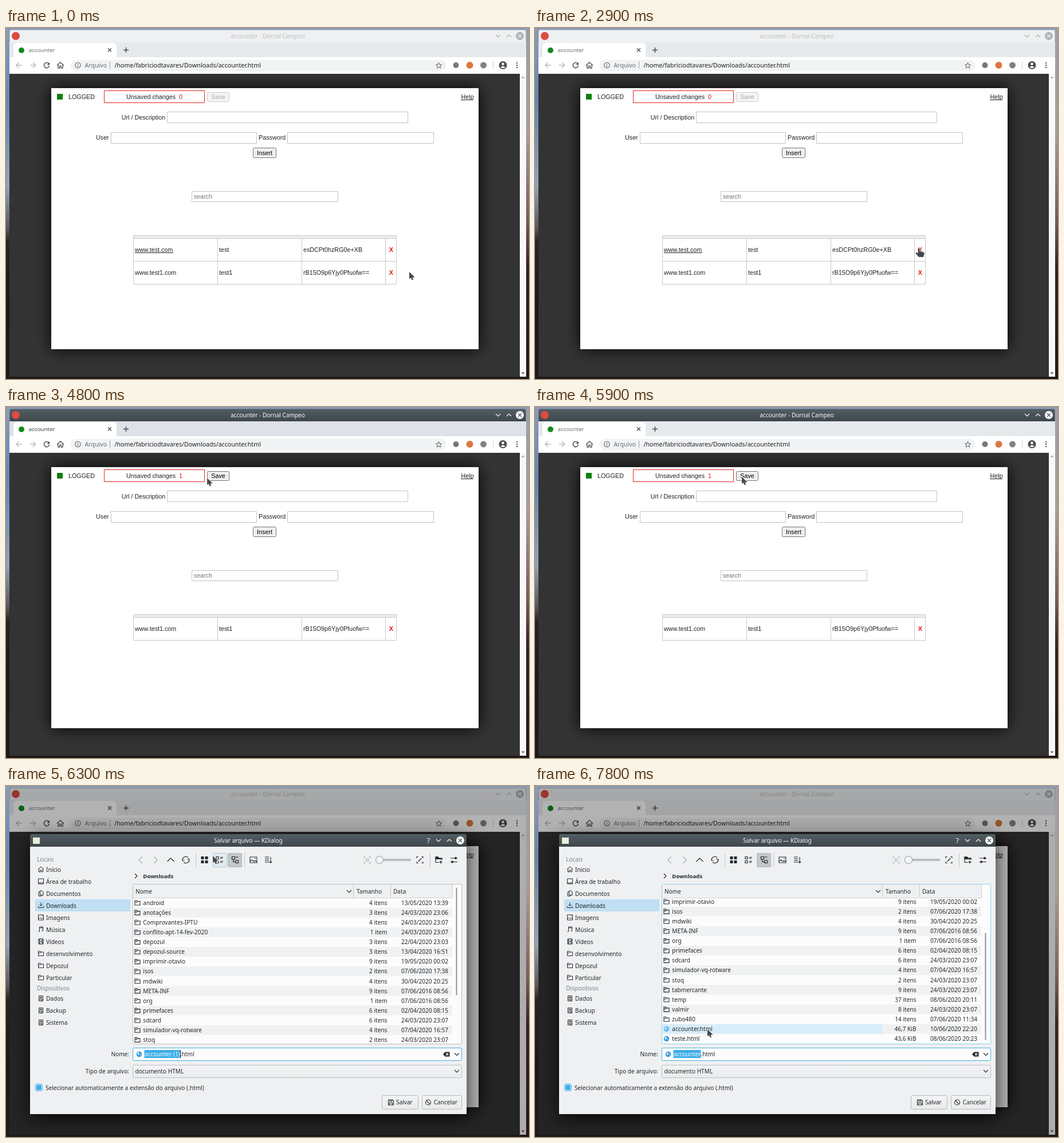
Recreate the animation shown at these times as an HTML page with a canvas. Size 913 by 613 pixels, loop 8000 ms.

```html
<!DOCTYPE html>
<html lang="pt-BR">
<head>
<meta charset="utf-8">
<title>accounter</title>
<style>
html, body { margin: 0; width: 100%; height: 100%; overflow: hidden; background: #333; }
canvas { display: block; }
</style>
</head>
<body>
<canvas id="stage" width="913" height="613"></canvas>
<script>
const ctx = document.getElementById('stage').getContext('2d');
const UI = '"Noto Sans", sans-serif';
const PAGE = '"Liberation Sans", Arial, sans-serif';
const INK = '#232629';
const LOOP = 8000, STEP = 100;

// ---------- helpers ----------
function say(str, x, y, color = INK, size = 10.1, font = UI, align = 'left', weight = '') {
  ctx.font = `${weight} ${size}px ${font}`;
  ctx.textAlign = align;
  ctx.fillStyle = color;
  ctx.fillText(str, x, y);
}
const web = (str, x, y, color = '#222', align = 'left', weight = '') =>
  say(str, x, y, color, 10.75, PAGE, align, weight);

function fill(x, y, w, h, color) {
  ctx.fillStyle = color;
  ctx.fillRect(x, y, w, h);
}

// Box given by its outer pixel edges.
function box(x1, y1, x2, y2, bg, edge, r = 0) {
  ctx.beginPath();
  ctx.roundRect(x1 + .5, y1 + .5, x2 - x1 - 1, y2 - y1 - 1, r);
  if (bg) { ctx.fillStyle = bg; ctx.fill(); }
  if (edge) { ctx.strokeStyle = edge; ctx.lineWidth = 1; ctx.stroke(); }
}

function dot(x, y, r, bg, edge) {
  ctx.beginPath();
  ctx.arc(x, y, r, 0, 7);
  if (bg) { ctx.fillStyle = bg; ctx.fill(); }
  if (edge) { ctx.strokeStyle = edge; ctx.lineWidth = 1.1; ctx.stroke(); }
}

function line(d, color = INK, width = 1.1, x = 0, y = 0) {
  ctx.save();
  ctx.translate(x, y);
  ctx.strokeStyle = color;
  ctx.lineWidth = width;
  ctx.stroke(new Path2D(d));
  ctx.restore();
}

function shape(d, color, x = 0, y = 0) {
  ctx.save();
  ctx.translate(x, y);
  ctx.fillStyle = color;
  ctx.fill(new Path2D(d));
  ctx.restore();
}

function ramp(y1, y2, ...stops) {
  const g = ctx.createLinearGradient(0, y1, 0, y2);
  stops.forEach(([at, color]) => g.addColorStop(at, color));
  return g;
}

const DOWN = 'M-4 -2L0 2L4 -2', UP = 'M-4 2L0 -2L4 2';
const CROSS = 'M-3 -3L3 3M3 -3L-3 3';
const titleInk = () => ramp(0, 0, [0, '#475057'], [1, '#475057']);
const darkBar = y => ramp(y, y + 22, [0, '#535e64'], [1, '#3d474c']);

// ---------- timeline ----------
const ROUTE = [
  [100, 704, 426], [200, 711, 427], [400, 716, 420], [600, 700, 402], [800, 680, 389],
  [1000, 670, 386], [1100, 692, 402], [1200, 742, 444], [1300, 772, 402], [1400, 745, 334],
  [1500, 680, 315], [1600, 612, 350], [1700, 640, 396], [1800, 672, 385], [2000, 672, 385],
  [2200, 674, 383], [2400, 669, 386], [2700, 669, 386], [2900, 670, 385], [3900, 670, 385],
  [4000, 643, 371], [4200, 555, 292], [4400, 452, 204], [4600, 362, 138], [4700, 345, 127],
  [4800, 351, 124], [4900, 358, 122], [5000, 361, 122], [6400, 361, 122], [6500, 388, 270],
  [6600, 413, 419], [6900, 413, 419], [7200, 365, 427], [7500, 303, 425], [7700, 303, 425],
  [7800, 301, 425]
];

function pointer(t) {
  const i = ROUTE.findIndex(p => p[0] >= t);
  if (i < 0) return ROUTE[ROUTE.length - 1].slice(1);
  if (i === 0) return ROUTE[0].slice(1);
  const [a, ax, ay] = ROUTE[i - 1], [b, bx, by] = ROUTE[i];
  const k = (t - a) / (b - a);
  return [ax + (bx - ax) * k, ay + (by - ay) * k].map(Math.round);
}

const ROW = 17.1, TOP = 195.45;
const scrollAt = t => t >= 6800 ? 104.6 : 0;

// Hover is refreshed one step after a scroll.
function hoverRow(t) {
  const [x, y] = pointer(t);
  if (x < 222 || x > 606 || y < TOP || y > 450) return -1;
  return Math.floor((y - TOP + scrollAt(t - STEP)) / ROW);
}

// ---------- desktop and browser ----------
function desktop() {
  fill(0, 0, 913, 613, ramp(0, 613, [0, '#8b9cb6'], [.2, '#6585b2'], [.45, '#92a3ba'],
    [.57, '#59585d'], [.61, '#29231f'], [.8, '#1c1715'], [1, '#211a18']));
  fill(906, 0, 7, 613, ramp(0, 613, [0, '#98a0ad'], [.3, '#a99c9a'], [.55, '#735c54'],
    [.68, '#35241f'], [1, '#241713']));
}

function titleButtons(y, color, cross, xs) {
  line(DOWN, color, 1.2, xs, y);
  line(UP, color, 1.2, xs + 19, y);
  dot(xs + 38, y, 7, color);
  line(CROSS, cross, 1.2, xs + 38, y);
}

function browser(active, stripActive) {
  box(6, 3, 908, 40, active ? darkBar(3) : '#eff0f1', null, 3);
  say('accounter - Dornal Campeo', 457, 17.7, active ? '#fcfcfc' : '#bbbec0', 10.05, UI, 'center');
  titleButtons(14, active ? '#fcfcfc' : '#aeb2b5', active ? '#475057' : '#eff0f1', 859);
  dot(17, 14, 7, '#dc4b3f');

  fill(6, 25, 902, 26, stripActive ? '#dee1e6' : '#e7eaed');
  ctx.beginPath();
  ctx.roundRect(13, 26, 180, 30, 6);
  ctx.fillStyle = '#fff';
  ctx.fill();
  fill(6, 51, 902, 29, '#fff');
  dot(27, 39, 5, '#128a1b');
  say('accounter', 39.5, 42, stripActive ? '#3c4043' : '#686c70', 9.8);
  line(CROSS, '#45494d', 1.3, 181, 38.5);
  line('M-4.5 0H4.5M0 -4.5V4.5', '#45494d', 1.5, 209.5, 38.5);

  line('M5 0H-4.5M0 -4.7L-4.7 0L0 4.7', '#b9bbbe', 1.4, 22.5, 65);
  line('M-5 0H4.5M0 -4.7L4.7 0L0 4.7', '#b9bbbe', 1.4, 47, 65);
  line('M3.6 -2.8A4.6 4.6 0 1 0 4.5 1', '#4b4f53', 1.5, 71, 65);
  shape('M5 -5V-.5H.5Z', '#4b4f53', 71, 65);
  line('M-6 .5L0 -5L6 .5M-4 -.5V5H-1.3V1.3H1.3V5H4V-.5', '#4b4f53', 1.3, 95, 65);

  box(112, 55, 769, 76, '#f1f3f4', null, 10);
  dot(125.5, 65, 4.7, null, '#5f6368');
  line('M0 -2.7V-1.4M0 -.4V2.8', '#5f6368', 1.2, 125.5, 65);
  say('Arquivo', 137.5, 68.7, '#6a6e72', 10.65);
  fill(181, 59, 1, 12, '#9a9da1');
  say('/home/fabriciodtavares/Downloads/accounter.html', 189.5, 68.7, '#202124', 10.65);
  line('M0 -5L1.4 -1.6L5 -1.3L2.2 1L3.1 4.6L0 2.6L-3.1 4.6L-2.2 1L-5 -1.3L-1.4 -1.6Z', '#55595d', 1, 755.5, 65.5);
  dot(785.5, 65, 5, '#77777f');
  dot(809.5, 65, 6, '#d9783f');
  dot(833.5, 65, 5.5, '#808386');
  fill(850, 58, 1, 14, '#cfd2d5');
  dot(867.5, 65, 7, '#4b4f53');
  dot(867.5, 62.7, 2.2, '#fff');
  shape('M-4 3.6Q0 -.6 4 3.6Q0 6.6 -4 3.6Z', '#fff', 867.5, 65);
  [-4, 0, 4].forEach(d => dot(892, 65 + d, 1.2, '#4b4f53'));
}

function button(label, x1, y1, x2, y2, state) {
  const off = state === 'off';
  const bg = off ? '#f4f4f4' : state === 'hover' ? '#e5e5e5' : '#efefef';
  box(x1, y1, x2, y2, bg, off ? '#cdcdcd' : '#767676', 2);
  web(label, (x1 + x2) / 2, y2 - 4.8, off ? '#acacac' : '#000', 'center');
}

function accountRow(y, site, user, code, link) {
  box(222, y, 682, y + 41, null, '#c8c8c8');
  [369, 516, 662].forEach(x => fill(x, y, 1, 40, '#c8c8c8'));
  web(site, 225, y + 24);
  if (link) fill(225, y + 25, 67, 1, '#222');
  web(user, 372, y + 24);
  web(code, 519, y + 24);
  web('X', 672.3, y + 24.3, '#e8120c', 'center', 'bold');
}

function page(changed, saveState) {
  ctx.save();
  ctx.beginPath();
  ctx.rect(6, 80, 891, 529);
  ctx.clip();
  fill(6, 80, 891, 529, '#333');
  ctx.shadowColor = '#000';
  ctx.shadowBlur = 26;
  fill(79, 105, 746, 456, '#fff');
  ctx.restore();

  fill(897, 80, 11, 529, '#f8f8f8');
  shape('M-3 1.5L0 -1.5L3 1.5Z', '#a3a3a3', 902.5, 86);
  shape('M-3 -1.5L0 1.5L3 -1.5Z', '#505050', 902.5, 603);

  fill(89, 115, 10, 10, '#0a800a');
  web('LOGGED', 109, 123.7);
  box(171, 109, 347, 131, '#fff', '#e52521');
  web('Unsaved changes', 210, 124);
  web(changed ? '1' : '0', 302, 124, '#d5160f');
  button('Save', 351, 112, 390, 129, saveState);
  web('Help', 794.5, 123.7);
  fill(794, 125, 22, 1, '#222');

  const edge = '#c3c3c3';
  web('Url / Description', 201.7, 160);
  box(281, 146, 702, 166, '#fff', edge);
  web('User', 157, 195);
  box(183, 182, 438, 202, '#fff', edge);
  web('Password', 441, 195);
  box(491, 182, 747, 202, '#fff', edge);
  button('Insert', 431, 209, 472, 227);
  box(324, 285, 580, 304, '#fff', edge);
  web('search', 327.7, 298, '#757575');

  box(222, 362, 682, 368, '#eee', '#c8c8c8');
  let y = 367;
  if (!changed) {
    accountRow(y, 'www.test.com', 'test', 'esDCPt0hzRG0e+XB', true);
    y += 40;
  }
  accountRow(y, 'www.test1.com', 'test1', 'rB15O9p6Yjy0Pfuofw==');
}

// ---------- file dialog ----------
const PLACES = [
  ['Início', 'M-5 0L0 -4.5L5 0M-3.5 -1V4.5H-1V1.5H1V4.5H3.5V-1'],
  ['Área de trabalho', 'M-4.5 -4.5H4.5V4.5H-4.5ZM-4.5 2.8H4.5'],
  ['Documentos', 'M-1.5 -4.5H2L4 -2.5V3H-1.5ZM-1.5 -2.5H-4V4.7H1.5V3'],
  ['Downloads', 'M0 -5V1M-2.5 -1.5L0 1L2.5 -1.5M-4.5 1.5V4H4.5V1.5'],
  ['Imagens', 'M-4.5 -4.5H4.5V4.5H-4.5ZM-4.5 3L-1.5 0L1 2.5L2.5 1L4.5 3M1.5 -2.5H3'],
  ['Música', 'M-2.5 3.5V-4.5H3.5V2.5M-2.5 -2.7H3.5M-4.5 3.5H-2.5M1.5 2.5H3.5'],
  ['Vídeos', 'M-4 -4.5H4V4.5H-4ZM-2 -4.5V4.5M2 -4.5V4.5M-2 0H2M-4 -2H-2M-4 2H-2M2 -2H4M2 2H4'],
  ['desenvolvimento'], ['Depozul'], ['Particular']
];
const DISK = 'M-3.5 -4.5H3.5V4.5H-3.5ZM-3.5 1.8H3.5M0 3.2H2M-1.5 -2.5H1.5V-.5H-1.5Z';
const FOLDER = 'M-4.5 4V-4H-1L0 -2.5H4.5V4ZM-4.5 -1H-1L0 -2.5';

const FILES = [
  ['android', '4 itens', '13/05/2020 13:39'],
  ['anotações', '3 itens', '24/03/2020 23:06'],
  ['Comprovantes-IPTU', '4 itens', '24/03/2020 23:07'],
  ['conflito-apt-14-fev-2020', '1 item', '24/03/2020 23:07'],
  ['depozul', '3 itens', '22/04/2020 23:03'],
  ['depozul-source', '3 itens', '13/04/2020 16:51'],
  ['imprimir-otavio', '9 itens', '19/05/2020 00:02'],
  ['isos', '2 itens', '07/06/2020 17:38'],
  ['mdwiki', '4 itens', '30/04/2020 20:25'],
  ['META-INF', '9 itens', '07/06/2016 08:56'],
  ['org', '1 item', '07/06/2016 08:56'],
  ['primefaces', '6 itens', '02/04/2020 08:15'],
  ['sdcard', '6 itens', '24/03/2020 23:07'],
  ['simulador-vq-rotware', '4 itens', '07/04/2020 16:57'],
  ['stoq', '2 itens', '24/03/2020 23:07'],
  ['tabmercante', '9 itens', '24/03/2020 23:07'],
  ['temp', '37 itens', '08/06/2020 20:11'],
  ['valmir', '8 itens', '24/03/2020 23:07'],
  ['zubo480', '14 itens', '07/06/2020 11:34'],
  ['accounter.html', '46,7 KiB', '10/06/2020 22:20'],
  ['teste.html', '43,6 KiB', '08/06/2020 20:23']
];

function globe(x, y, color = '#2b95d6') {
  dot(x, y, 4.7, color);
  shape('M-3 -2.5L0 -3.3L.6 -1L-1.3 .6L-.6 3L-2.8 .6ZM1.4 .2L3.6 -.6L2.3 2.8Z', '#e8f4fc', x, y);
}

function sidebar() {
  say('Locais', 54, 131.6, '#7d868a');
  fill(51, 198, 166, 21, '#c0dff3');
  PLACES.forEach(([name, icon = FOLDER], i) => {
    const y = 145.5 + 21 * i;
    line(icon, INK, 1, 61, y);
    say(name, 70, y + 4);
  });
  say('Dispositivos', 54, 357, '#7d868a');
  ['Dados', 'Backup', 'Sistema'].forEach((name, i) => {
    const y = 371 + 21 * i;
    line(DISK, INK, 1, 61, y);
    say(name, 70, y + 4);
  });
}

function toolbar(hover) {
  const y = 129, pale = '#a5a9ac';
  if (hover) box(361, 117, 386, 142, '#e3eaee', '#9fd0ea', 2);
  box(387, 117, 412, 142, '#c3c6c8', '#b7babd', 2);
  line('M3 -6L-3 0L3 6', pale, 1.1, 235, y);
  line('M-3 -6L3 0L-3 6', pale, 1.1, 261.5, y);
  line('M-6 3L0 -3L6 3', INK, 1.2, 287.5, y);
  line('M-5.5 1A5.5 5.5 0 0 1 4 -3.8M5.5 -1A5.5 5.5 0 0 1 -4 3.8M-5.8 -2.5V1.2H-2.4M5.8 2.5V-1.2H2.4', INK, 1.1, 314, y);
  [331, 416].forEach(x => fill(x, 117, 1, 25, '#c2c5c7'));
  [-6, 1].forEach(dx => [-6, 1].forEach(dy => fill(346.5 + dx, y + dy, 5, 5, INK)));
  [-6, 1].forEach(dy => {
    line('M.5 .5H4.5V4.5H.5Z', INK, 1.2, 366.5, y + dy);
    fill(374, y + dy + 1, 5, 1, INK);
    fill(374, y + dy + 3, 4, 1, INK);
  });
  line('M-5.5 -5.5H-.5V-1H-5.5ZM1 1H5.5V5.5H1ZM1 -5H5.5M-3 -1V3.5H1', INK, 1.2, 400, y);
  line('M-6 -5H6V5H-6ZM-6 3L-2.5 0L1 3L3 1L6 4M2 -2.5H4', INK, 1.1, 432, y);
  line('M-6 -5H1M-6 -2H1M-6 1H1M-6 4H1M4 -5V5M1.8 3L4 5.2L6.2 3', INK, 1.1, 458, y);

  line('M-5.5 -3V-5.5H-3M3 -5.5H5.5V-3M5.5 3V5.5H3M-3 5.5H-5.5V3M-2 -2H2V2H-2Z', pale, 1, 630.5, y);
  fill(658, 127, 49, 4, '#babdbf');
  dot(652, y, 6.5, '#f4f5f6', '#9da2a5');
  line('M-5.5 -3V-5.5H-3M3 -5.5H5.5V-3M5.5 3V5.5H3M-3 5.5H-5.5V3M-3 3L3 -3', INK, 1.1, 722.5, y);
  fill(740, 117, 1, 25, '#c2c5c7');
  line('M-5.5 4.5V-5H-1L0 -3H5.5V0M-5.5 4.5H0M3.5 1V6.5M.8 3.8H6.2', INK, 1.2, 755.5, y);
  shape('M-6 -5.5H-1L0 -3H6V-1H-6Z', INK, 755.5, y);
  line('M-6 -3H6M-6 3.5H6', INK, 1.1, 782, y);
  dot(785, y - 3, 2, INK);
  dot(779, y + 3.5, 2, INK);
}

function fileList(t) {
  const scroll = scrollAt(t), hover = hoverRow(t), trail = hoverRow(t - STEP);
  const picked = t >= 7600 ? 19 : -1;
  box(221, 171, 796, 451, '#fcfcfc', t >= 6500 ? '#93cee9' : '#bcc0c3', 2);
  ctx.save();
  ctx.beginPath();
  ctx.rect(222, 195, 573, 255);
  ctx.clip();
  FILES.forEach(([name, size, date], i) => {
    const y = TOP + ROW * i - scroll, mid = y + ROW / 2;
    if (i % 2) fill(222, y, 557, ROW, '#f0f1f2');
    if (i === picked) fill(222, y, 384, ROW, '#d8edf9');
    else if (i === hover || i === trail) fill(222, y, 384, ROW, '#e6eef4');
    if (name.endsWith('.html')) globe(229.5, mid, i === hover ? '#56b4e8' : '#2b95d6');
    else line(FOLDER, INK, 1.1, 229.5, mid);
    say(name, 239.3, mid + 3.7);
    say(size, 665.5, mid + 3.7, INK, 10.1, UI, 'right');
    say(date, 772, mid + 3.7, INK, 10.1, UI, 'right');
  });
  ctx.restore();
  fill(222, 172, 557, 23, '#eff0f1');
  fill(222, 195, 557, 1, '#cfd2d4');
  [606, 671, 779].forEach(x => fill(x, 172, 1, 23, '#c9cccf'));
  say('Nome', 226, 187.6);
  line(DOWN, INK, 1.1, 599, 184);
  say('Tamanho', 612, 187.6);
  say('Data', 676, 187.6);
  box(785, scroll ? 256 : 177, 788, scroll ? 444 : 366, '#8d9295', null, 1);
}

function nameField(t) {
  const chosen = t < 7800 ? 'accounter (1)' : 'accounter';
  say('Nome:', 215, 472, INK, 10.1, UI, 'right');
  box(221, 457, 796, 480, '#fcfcfc', '#45aee6', 2);
  globe(232.5, 468.5);
  ctx.font = `10.1px ${UI}`;
  const w = ctx.measureText(chosen).width;
  fill(241.5, 461, w + .5, 14, '#3daee9');
  say(chosen, 242, 472, '#fcfcfc');
  say('.html', 242 + w, 472);
  if ((t - 6100) % 1000 < 500) fill(Math.round(242 + w), 461, 1, 14, INK);
  shape('M-6 0L-2.5 -4H5.5V4H-2.5Z', INK, 769, 468.5);
  line('M-1 -2L3 2M3 -2L-1 2', '#fcfcfc', 1.1, 769, 468.5);
  line(DOWN, INK, 1.1, 787, 468.5);
}

function dialog(t) {
  ctx.save();
  ctx.shadowColor = 'rgba(0,0,0,.75)';
  ctx.shadowBlur = 32;
  ctx.shadowOffsetY = 8;
  box(42, 84, 804, 573, '#eff0f1', null, 3);
  ctx.restore();
  fill(42, 100, 762, 473, '#eff0f1');
  ctx.beginPath();
  ctx.roundRect(42, 84, 762, 22, [3, 3, 0, 0]);
  ctx.fillStyle = darkBar(84);
  ctx.fill();
  fill(47, 90, 12, 11, '#e9ecd9');
  say('Salvar arquivo — KDialog', 423, 98.7, '#fcfcfc', 10.1, UI, 'center');
  say('?', 737.5, 100, '#fcfcfc', 12.5, UI, 'center');
  titleButtons(95, '#fcfcfc', '#475057', 755);

  sidebar();
  toolbar(t < 6500);
  line('M-2 -4L2 0L-2 4', INK, 1.1, 227, 157);
  say('Downloads', 239.3, 161, INK, 9.6, UI, 'left', 'bold');
  fileList(t);
  nameField(t);

  const soft = y => ramp(y, y + 24, [0, '#f3f4f5'], [1, '#e9eaeb']);
  say('Tipo de arquivo:', 215, 501.6, INK, 10.1, UI, 'right');
  box(221, 487, 796, 510, soft(487), '#bcc0c3', 2);
  say('documento HTML', 225.5, 501.6);
  line(DOWN, INK, 1.1, 787, 498);
  box(51, 520, 64, 533, '#fcfcfc', '#3daee9', 2);
  fill(53, 522, 9, 9, '#3daee9');
  say('Selecionar automaticamente a extensão do arquivo (.html)', 69, 530.6);
  box(656, 540, 720, 565, soft(540), '#b6babd', 2);
  line('M-4.5 -4.5H2.5L4.5 -2.5V4.5H-4.5ZM-2.5 4.5V.8H2.5V4.5M-2 -4.5V-2H1.5V-4.5', INK, 1.1, 672, 552.5);
  say('Salvar', 681, 556.3);
  box(726, 540, 796, 565, soft(540), '#b6babd', 2);
  dot(737, 552.5, 4.5, null, INK);
  line('M-3 -3L3 3', INK, 1.1, 737, 552.5);
  say('Cancelar', 746.7, 556.3);
}

// ---------- pointer ----------
const ARROW = 'M0 0L0 12L2.8 10.3L5 14.6L7 13.6L5.6 9.8L9.6 9.2Z';
const HAND = 'M-1.6 .8Q0 -1.6 1.3 .8L1.6 5L8 6.4Q10 7 9.6 9.5L8 15H0L-5.6 8.6Q-5.4 6 -2.6 7.4L-1.2 8.4Z';

function drawPointer(t, changed, modal) {
  const [x, y] = pointer(t);
  const onCross = !modal && x > 662 && x < 682 && y > 367 && y < (changed ? 407 : 447);
  const d = onCross ? HAND : ARROW;
  line(d, 'rgba(255,255,255,.75)', 1.6, x, y);
  shape(d, '#46484b', x, y);
}

// ---------- loop ----------
function draw(t) {
  const active = t >= 3400 && t < 6100;
  const changed = t >= 3500;
  const modal = t >= 6100;
  const over = t >= 4900 && t < 5900;
  desktop();
  browser(active, active && t < 5900);
  page(changed, !changed ? 'off' : over ? 'hover' : 'on');
  if (modal) {
    fill(6, 3, 902, 606, `rgba(0,0,0,${Math.min(.3, .26 + (t - 6100) / 5000)})`);
    dialog(t);
  }
  drawPointer(t, changed, modal);
}

let last = -1;
function tick() {
  const t = Math.floor(performance.now() % LOOP / STEP) * STEP;
  if (t !== last) draw(last = t);
  requestAnimationFrame(tick);
}
tick();
</script>
</body>
</html>
```
